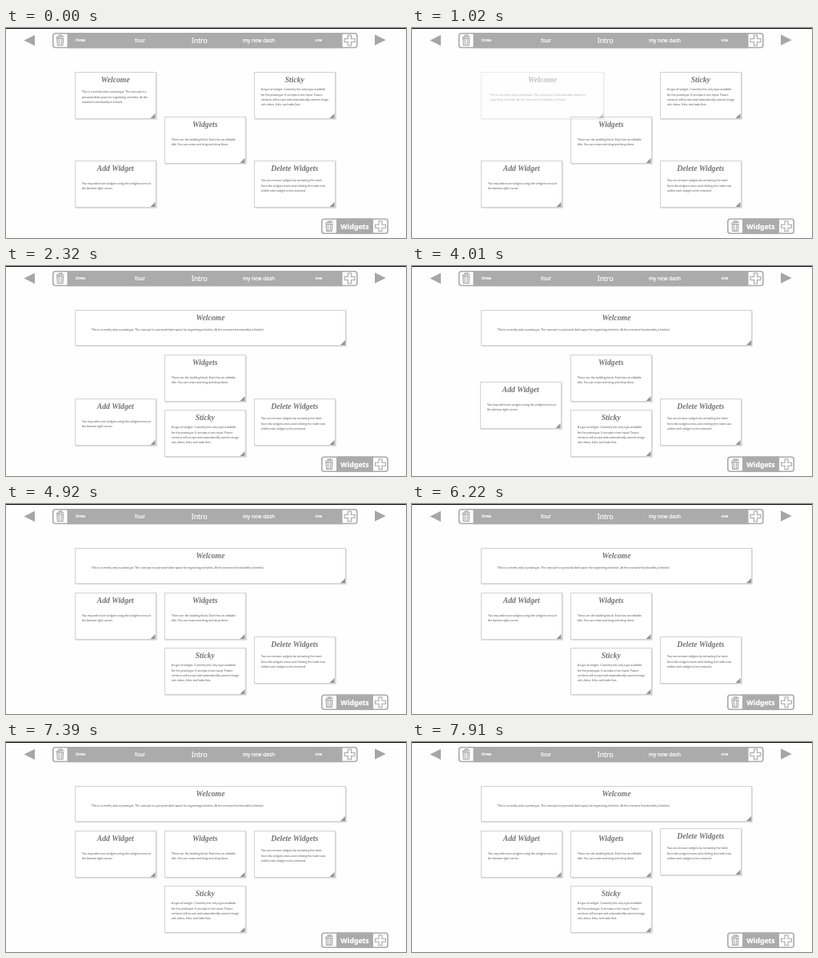
Animation, 500 px wide and 263 px high, one loop 8000 ms. Source, as an HTML page:

```html
<!DOCTYPE html>
<html lang="en">
<head>
<meta charset="utf-8">
<title>Widget dashboard</title>
<style>
  html, body { margin: 0; width: 100%; height: 100%; overflow: hidden; background: #fff; }
  #stage { position: relative; width: 500px; height: 263px; overflow: hidden; background: #fefefe; }
  svg { position: absolute; left: 0; top: 0; }
  svg text {
    font-family: "Noto Sans", "Open Sans", sans-serif; text-anchor: middle;
    fill: #fff; stroke: #fff; stroke-width: .2px;
  }

  .card {
    position: absolute; box-sizing: border-box;
    left: var(--x); top: var(--y); width: 101.5px; height: 59px;
    background: #fff; border: 1px solid #d2d2d2;
    box-shadow: .5px .7px 1.5px rgba(0, 0, 0, .36);
  }
  .card::after {
    content: ""; position: absolute; right: 0; bottom: 0; width: 6px; height: 6px;
    background: #949494; clip-path: polygon(100% 0, 100% 100%, 0 100%);
  }
  h2 {
    position: absolute; left: 0; right: 0; top: 2.6px; margin: 0;
    font: italic bold 9.7px/12px "Liberation Serif", "Times New Roman", serif;
    color: #747474; text-align: center; white-space: nowrap;
  }
  .body {
    position: absolute; inset: 5px 0 0; padding: 0 6% 0 calc(5% + 2.8px);
    display: flex; align-items: center;
  }
  p { margin: 0; font: 3.9px/6.4px Lato, "Open Sans", sans-serif; letter-spacing: -.09px; color: #626262; }
  .fixed p { white-space: nowrap; }

  /* Every stepped segment advances once per 130 ms. */
  .welcome, .sticky, .add, .delete { animation: 8s step-end infinite; }
  .welcome { z-index: 2; animation-name: resize; }
  .sticky { animation-name: drop; }
  .add { animation-name: dragAdd; }
  .delete { z-index: 3; animation-name: dragDelete; }

  @keyframes resize {
    0% { width: 101.5px; height: 59px; opacity: 1; background: #fff; }
    6.25% { width: 103px; height: 59px; opacity: .45; background: transparent; animation-timing-function: steps(2); }
    9.5% { width: 114px; height: 59px; opacity: .45; background: transparent; animation-timing-function: steps(2); }
    12.75% { width: 154px; height: 59px; opacity: .45; background: transparent; animation-timing-function: steps(6); }
    22.5% { width: 315px; height: 49px; opacity: .5; background: transparent; animation-timing-function: steps(3); }
    27.375% { width: 347px; height: 45px; opacity: .5; background: transparent; }
    29%, 100% { width: 339px; height: 45px; opacity: 1; background: #fff; }
  }
  @keyframes drop {
    0% { left: 310px; top: 55px; }
    29%, 100% { left: 198px; top: 180px; }
  }
  @keyframes dragAdd {
    0% { left: 86px; top: 166px; }
    50.125% { left: 85px; top: 145px; animation-timing-function: steps(2); }
    53.375% { left: 85px; top: 121px; animation-timing-function: steps(4); }
    59.875% { left: 85px; top: 109px; }
    61.5%, 100% { left: 86px; top: 111px; }
  }
  @keyframes dragDelete {
    0% { left: 310px; top: 166px; }
    81% { left: 313px; top: 157px; animation-timing-function: steps(2); }
    84.25% { left: 318px; top: 128px; animation-timing-function: steps(3); }
    89.125% { left: 311px; top: 112px; }
    92.375% { left: 310px; top: 111px; animation-timing-function: steps(4); }
    98.875%, 100% { left: 310px; top: 108px; }
  }
</style>
</head>
<body>
<div id="stage">
  <svg width="500" height="263" viewBox="0 0 500 263">
    <defs>
      <g id="trash" fill="none" stroke="#a4a4a4">
        <path d="M-5 -4.4L5 -5.2M-2 -5L-1.8 -6.4L2 -6.7V-5.2" stroke-width="1.2"/>
        <path d="M-4 -2.8L-3.3 6H3.3L4 -2.8Z" fill="#f4f4f4" stroke-width="1.1"/>
        <path d="M-1.6 -2L-1.3 5M1.6 -2L1.3 5" stroke-width=".9"/>
      </g>
      <path id="plus" d="M-2 -6.5H2V-2H6.5V2H2V6.5H-2V2H-6.5V-2H-2Z"
        fill="#fff" stroke="#a6a6a6" stroke-width="1.1"/>
    </defs>
    <rect width="500" height="1" fill="#000"/>
    <path d="M36 8.8V22.2L22.5 15.5ZM461 8.3V21.7L474.7 15Z" fill="#a6a6a6"/>

    <rect x="58.8" y="6.8" width="380" height="17.7" rx="3" fill="#fff" stroke="#a9a9a9" stroke-width="1.6"/>
    <rect x="76.5" y="6" width="344" height="19.3" fill="#ababab"/>
    <use href="#trash" x="67.7" y="15.7"/>
    <use href="#plus" x="429.5" y="15.5"/>
    <text x="93" y="17.2" font-size="4.8">three</text>
    <text x="167.5" y="17.8" font-size="6.7">four</text>
    <text x="241.7" y="18.6" font-size="8.6">Intro</text>
    <text x="316" y="17.8" font-size="6.5">my new dash</text>
    <text x="390.8" y="17.2" font-size="4.8">one</text>

    <rect x="394.8" y="239.3" width="82.4" height="18" rx="3" fill="#fff" stroke="#a9a9a9" stroke-width="1.6"/>
    <rect x="413" y="238.5" width="46" height="19.6" fill="#ababab"/>
    <use href="#trash" x="404" y="248.4"/>
    <use href="#plus" x="468" y="248.3"/>
    <text x="436" y="251.5" font-size="8.7" font-weight="600">Widgets</text>
  </svg>

  <section class="card welcome" style="--x:86px; --y:55px">
    <h2>Welcome</h2>
    <div class="body"><p>This is currently only a prototype. The concept is a personal dash space for organizing activities. At the moment functionality is limited.</p></div>
  </section>
  <section class="card fixed sticky">
    <h2>Sticky</h2>
    <div class="body"><p>A type of widget. Currently the only type available<br>for the prototype. It accepts a text input. Future<br>versions will accept and automatically convert image<br>urls, dates, links, and todo lists.</p></div>
  </section>
  <section class="card fixed" style="--x:198px; --y:111px">
    <h2>Widgets</h2>
    <div class="body"><p>These are the building block. Each has an editable<br>title. You can resize and drag and drop them.</p></div>
  </section>
  <section class="card fixed add">
    <h2>Add Widget</h2>
    <div class="body"><p>You may add more widgets using the widgets menu in<br>the bottom right corner.</p></div>
  </section>
  <section class="card fixed delete">
    <h2>Delete Widgets</h2>
    <div class="body"><p>You can remove widgets by activating the trash<br>from the widgets menu and clicking the trash icon<br>within each widget to be removed.</p></div>
  </section>
</div>
</body>
</html>
```
